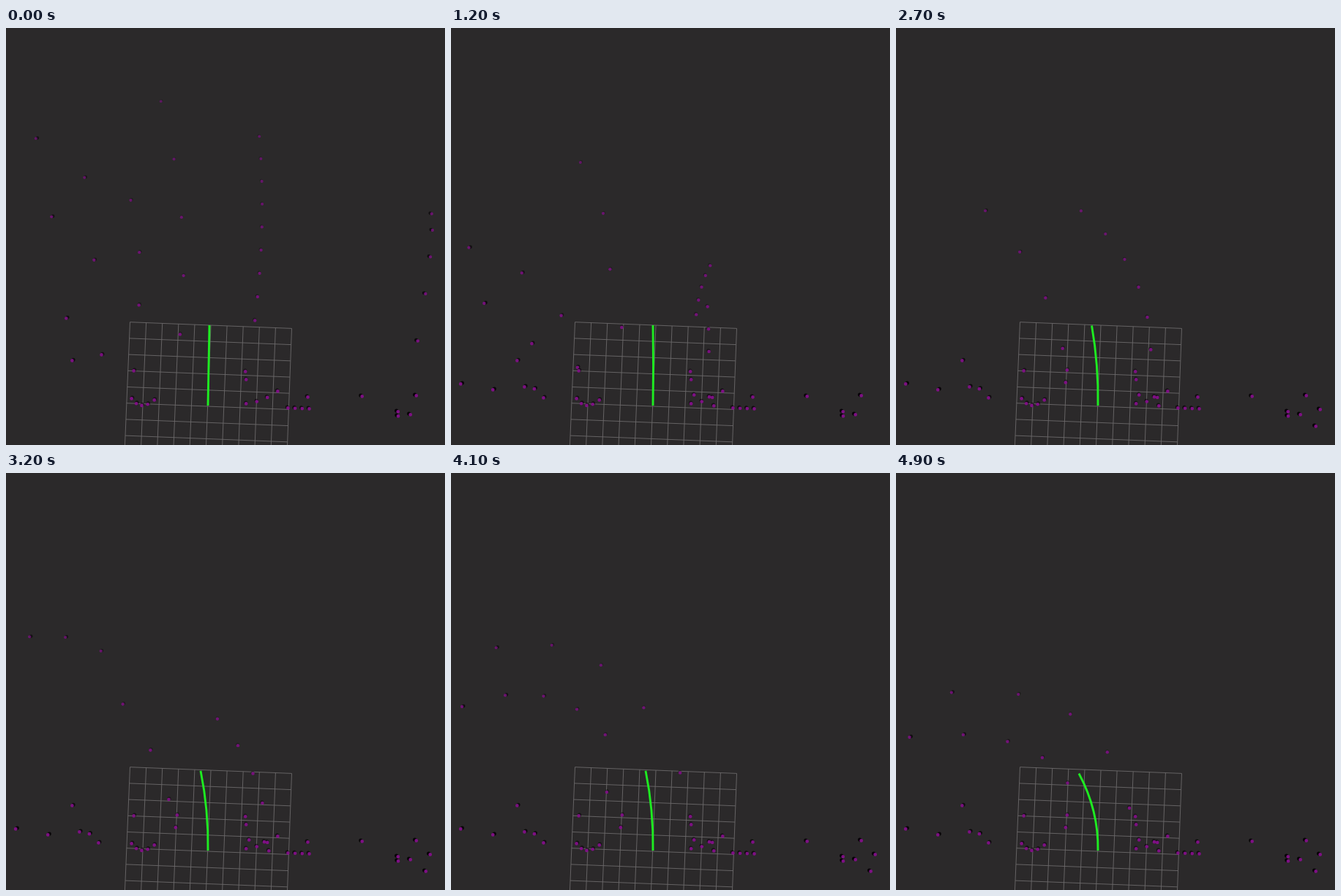
Recreate the animation shown at these times as an HTML page with a canvas. Size 600 px wide and 571 px high, loop 5000 ms.

```html
<!DOCTYPE html>
<html>
<head>
<meta charset="utf-8">
<style>
  html, body { margin: 0; width: 100%; height: 100%; overflow: hidden; background: #2b292a; }
  canvas { display: block; }
</style>
</head>
<body>
<canvas id="view" width="600" height="571"></canvas>
<script>
const ctx = document.getElementById('view').getContext('2d');
const LOOP = 5, STEP = .1, STEPS = 50; // seconds
const CAR = { x: 276, y: 517 };
const LOST_BELOW = 465;

const heading = t => .066 * Math.max(0, t - .6) ** 2;
const speed = t => 198 - 8 * t;

const mix = (a, b, t) => a + (b - a) * t;
const clamp = (v, lo, hi) => Math.max(lo, Math.min(hi, v));

function bezier(points, t) {
  while (points.length > 1)
    points = points.slice(1).map((p, i) => [mix(points[i][0], p[0], t), mix(points[i][1], p[1], t)]);
  return points[0];
}

// Cones spread evenly along a curve.
const row = (count, curve) =>
  Array.from({ length: count }, (_, i) => bezier(curve, i / (count - 1)));

// Tracked rows lie where they appear at time `at`; their cones are found one by one.
const tracked = [], parked = [];
const track = (at, from, gap, to, count, ...curve) =>
  row(count, curve).forEach((p, i) => tracked.push({ p, at, from: from + i * gap, to }));
const park = (from, count, ...curve) =>
  row(count, curve).forEach(p => parked.push({ p, from }));

// Inner edge of the track
track(0, 0, 0, 2.5, 5, [238, 419], [255, 258], [212, 100]);
track(1.9, .8, .25, LOOP, 5, [226, 378], [187, 225], [64, 139]);
track(4.1, 2.75, .15, LOOP, 6, [211, 358], [123, 250], [-50, 352]);
// Outer edge
track(0, 0, 0, 1.7, 9, [340, 400], [356, 270], [346, 148]);
track(1.2, .6, .1, 1.7, 5, [335, 392], [340, 350], [354, 325]);
track(2.7, 1.5, .2, LOOP, 6, [348, 440], [345, 325], [253, 250]);
track(4.1, 3.4, .15, LOOP, 6, [313, 410], [200, 149], [-22, 273]);
// Straights on either side
track(0, -.3, .15, 2.3, 4, [83, 397], [54, 165], [19, 75]);
track(0, -.3, .15, 2.3, 4, [131, 447], [118, 240], [92, 108]);
track(0, -.3, .15, 2.3, 4, [182, 379], [192, 270], [147, 165]);
track(0, 0, 0, 1, 5, [562, 428], [587, 285], [581, 254]);

park(0, 2, [91, 455], [175, 469]);
park(0, 5, [172, 507], [184, 525], [203, 509]);
park(0, 2, [327, 470], [328, 481]);
park(0, 4, [328, 514], [350, 512], [371, 497]);
park(0, 4, [385, 520], [414, 521]);
park(0, 3, [412, 505], [560, 503]);
park(0, 3, [535, 525], [527, 535], [552, 529]);
park(.6, 3, [332, 502], [360, 500], [359, 517]);
park(.8, 2, [14, 487], [58, 495]);
park(1.1, 3, [101, 491], [115, 489], [127, 506]);
park(1.5, 2, [234, 468], [232, 485]);
park(1.5, 2, [579, 522], [573, 545]);

const rotate = (x, y, angle) => {
  const c = Math.cos(angle), s = Math.sin(angle);
  return [x * c - y * s, x * s + y * c];
};

const poses = [{ x: 0, y: 0, angle: 0 }];
for (let i = 1; i < STEPS; i++) {
  const last = poses[i - 1], t = i * STEP, angle = heading(t);
  const [dx, dy] = rotate(0, -speed(t) * STEP, -angle);
  poses.push({ x: last.x + dx, y: last.y + dy, angle });
}

// Moves a point from the view of one pose to the view of another.
function carry([x, y], from, to) {
  const [wx, wy] = rotate(x - CAR.x, y - CAR.y, -from.angle);
  const [sx, sy] = rotate(wx + from.x - to.x, wy + from.y - to.y, to.angle);
  return [sx + CAR.x, sy + CAR.y];
}

function line(color, width, draw) {
  ctx.strokeStyle = color;
  ctx.lineWidth = width;
  ctx.beginPath();
  draw();
  ctx.stroke();
}

function disc(x, y, r, color, alpha) {
  ctx.globalAlpha = alpha;
  ctx.fillStyle = color;
  ctx.beginPath();
  ctx.arc(x, y, r, 0, 7);
  ctx.fill();
  ctx.globalAlpha = 1;
}

// A purple ball, fainter far ahead, with its dark side towards the middle of the view.
function marker([x, y]) {
  const near = clamp(y / 500, 0, 1), side = clamp((CAR.x - x) / 180, -1.3, 1.3);
  const r = mix(2, 2.6, near);
  disc(x + side, y - .9 * near, r, '#060206', clamp(Math.abs(side) * .45 + near ** 3 * .4, 0, 1));
  disc(x - side * .6, y + .4, r * .9, '#84108a', mix(.5, .95, near));
}

function grid() {
  line('#6b696a', .9, () => {
    for (let i = 0; i <= 10; i++) {
      const x = 169.5 + 22.1 * i, y = 402.7 + .87 * i;
      ctx.moveTo(x, y);
      ctx.lineTo(x - 7.4 + .08 * i, y + 177);
    }
    for (let i = 0; i <= 8; i++) {
      const y = 402.7 + 22.2 * i;
      ctx.moveTo(169.5 - .92 * i, y);
      ctx.lineTo(390.5 - .83 * i, y + 8.7);
    }
  });
}

// Sideways position of the planned path's far end.
const TIPS = [[0, 278], [1.2, 276], [1.9, 270], [3.2, 266], [4.1, 266], [4.9, 250]];
function tipAt(t) {
  const i = Math.max(1, TIPS.findIndex(k => k[0] >= t - 1e-6));
  const [t0, x0] = TIPS[i - 1], [t1, x1] = TIPS[i];
  return mix(x0, x1, (t - t0) / (t1 - t0));
}

function path(tip) {
  const bend = tip - CAR.x;
  line('#1eec21', 2.9, () => {
    ctx.moveTo(CAR.x, CAR.y);
    ctx.quadraticCurveTo(277, 462, tip, 407 + bend * bend / 150);
  });
}

function draw(step) {
  const t = step * STEP;
  ctx.fillStyle = '#2b292a';
  ctx.fillRect(0, 0, 600, 571);
  grid();
  tracked
    .filter(c => t >= c.from && t < c.to)
    .map(c => carry(c.p, poses[Math.round(c.at / STEP)], poses[step]))
    .filter(p => p[1] < LOST_BELOW)
    .forEach(marker);
  parked.filter(c => t >= c.from).forEach(c => marker(c.p));
  path(tipAt(t));
}

function tick() {
  draw(Math.floor(performance.now() / 1000 % LOOP / STEP));
  requestAnimationFrame(tick);
}
tick();
</script>
</body>
</html>
```
